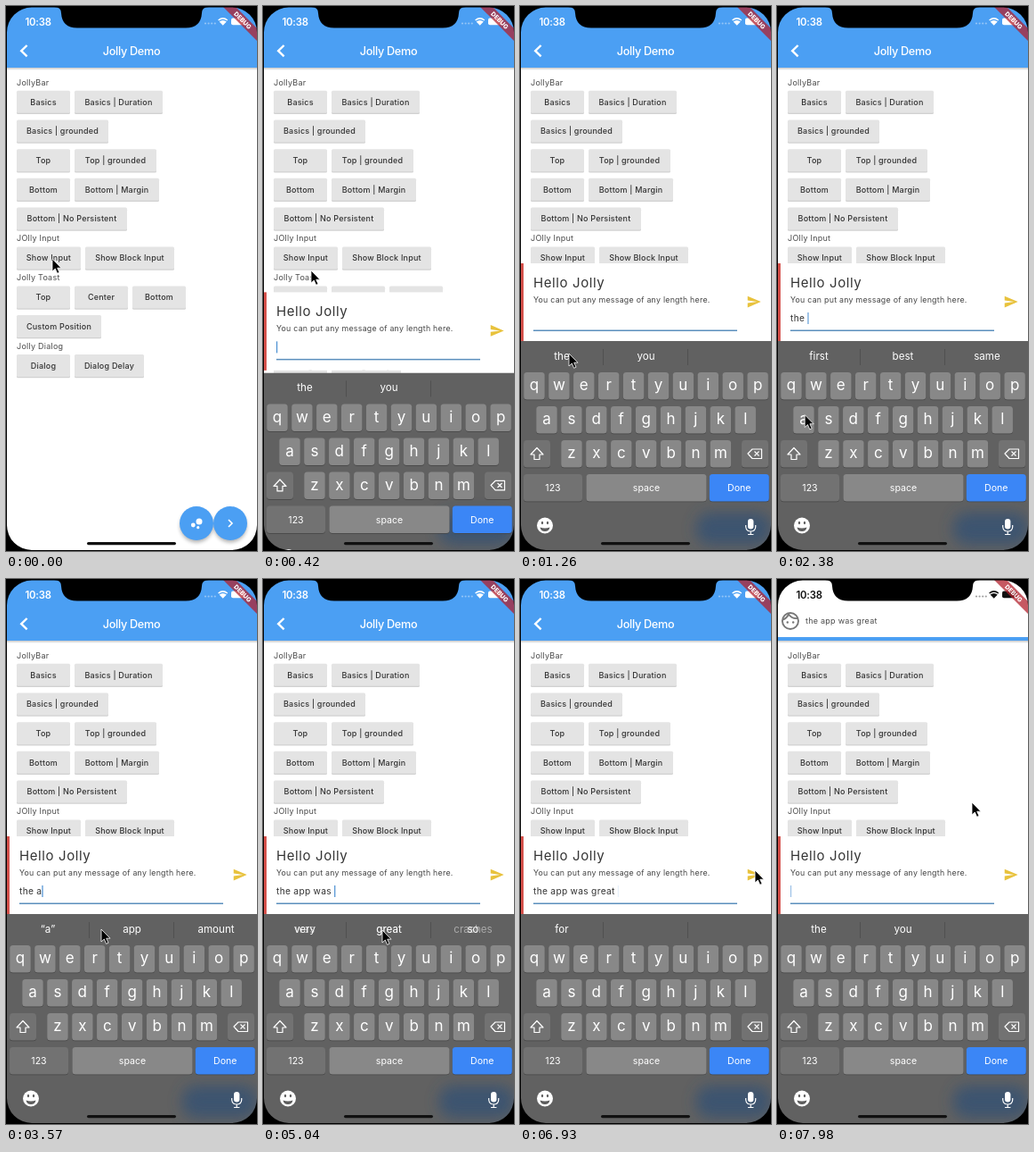
An HTML page for the animation above (8000 ms loop, 282x610 px).

```html
<!DOCTYPE html>
<html lang="en">
<head>
<meta charset="utf-8">
<title>Demo</title>
<style>
html, body { margin: 0; width: 100%; height: 100%; overflow: hidden; background: #fff; }
svg { display: block; width: 100vw; height: 100vh; }
text { font-family: Inter, "Open Sans", sans-serif; white-space: pre; }
.label { font-size: 9px; letter-spacing: .25px; fill: #4a4a4a; }
.button { font-size: 9px; font-weight: 500; letter-spacing: .2px; fill: #333; }
.hint { font-size: 11.6px; fill: #fff; }
.letter { font-size: 17px; fill: #fff; }
.command { font-size: 10.6px; fill: #fff; }
.mid { text-anchor: middle; }
</style>
</head>
<body>
<svg viewBox="0 0 282 610">
  <defs>
    <filter id="blur" x="-50%" y="-100%" width="200%" height="300%"><feGaussianBlur stdDeviation="8"/></filter>
    <filter id="soft" x="-40%" y="-40%" width="180%" height="180%"><feGaussianBlur stdDeviation="2"/></filter>
    <linearGradient id="fade" x2="0" y2="1"><stop stop-opacity=".22"/><stop offset="1" stop-opacity="0"/></linearGradient>
    <clipPath id="boardClip"><rect y="375" width="282" height="600"/></clipPath>
  </defs>
  <rect width="282" height="610" fill="#fff"/>

  <g id="page"></g>
  <rect y="69" width="282" height="3" fill="url(#fade)"/>
  <rect width="282" height="69" fill="#4b9ff3"/>
  <path d="M23.6 44L17.2 50.2L23.6 56.4" fill="none" stroke="#fff" stroke-width="2.4"/>
  <text class="mid" x="141" y="54.5" font-size="12.7" font-weight="500" letter-spacing="-.3" fill="#fff">Jolly Demo</text>

  <g fill="#000" opacity=".3" filter="url(#soft)"><circle cx="214" cy="582" r="18.5"/><circle cx="252" cy="582" r="18.5"/></g>
  <g fill="#4b9ff3"><circle cx="214" cy="579" r="19"/><circle cx="252" cy="579" r="19"/></g>
  <g fill="#fff"><circle cx="210.3" cy="581" r="2.4"/><circle cx="217" cy="577" r="3.5"/><circle cx="215.8" cy="583.7" r="1.6"/></g>
  <path d="M250 575l4 4l-4 4" fill="none" stroke="#fff" stroke-width="1.6"/>

  <g id="sheet">
    <rect y="288" width="282" height="87.5" fill="#fff"/>
    <rect y="288" width="4" height="87.5" fill="#d5504a"/>
    <text x="15" y="314.5" font-size="15" letter-spacing=".6" fill="#333">Hello Jolly</text>
    <text x="15" y="331.5" font-size="8.8" letter-spacing=".26" fill="#444">You can put any message of any length here.</text>
    <path transform="translate(254.3 322.5) scale(.71)" d="M2 21L23 12L2 3V10L17 12L2 14z" fill="#e8c23c"/>
    <text id="entry" x="15" y="352.5" font-size="10.2" letter-spacing=".3" fill="#333"></text>
    <rect id="caret" y="343" width="1.2" height="13" fill="#4a8fd2"/>
    <rect x="15" y="362.5" width="229" height="1.5" fill="#5b8fbd"/>
  </g>
  <g id="board" clip-path="url(#boardClip)">
    <rect y="375" width="282" height="236" fill="#616161"/>
    <rect id="glow" x="198" y="567" width="84" height="36" rx="16" fill="#2f4f76" opacity=".72" filter="url(#blur)"/>
    <path d="M93.5 384V402M188.5 384V402" stroke="#505050"/>
  </g>
  <rect id="home" x="91" y="600" width="100" height="3.2" rx="1.6" fill="#111"/>

  <g id="toast">
    <rect y="-10" width="282" height="75" fill="#fff"/>
    <g fill="none" stroke="#777" stroke-width="1.9">
      <circle cx="15" cy="47" r="9"/>
      <path d="M6.5 45.5Q11 44 13 39.5Q17 45 23.5 44"/>
    </g>
    <g fill="#777"><circle cx="11.8" cy="48.5" r="1.2"/><circle cx="18.2" cy="48.5" r="1.2"/></g>
    <text class="label" x="32" y="50.3">the app was great</text>
  </g>

  <g id="status">
    <text x="21.5" y="22" font-size="11.3" font-weight="600" letter-spacing="-.2">10:38</text>
    <g opacity=".4"><circle cx="224" cy="19.5" r="1.1"/><circle cx="227.6" cy="19.5" r="1.1"/><circle cx="231.2" cy="19.5" r="1.1"/><circle cx="234.8" cy="19.5" r="1.1"/></g>
    <path d="M239.6 17.5L243.7 21.8L247.8 17.5Q243.7 14.5 239.6 17.5z"/>
    <path d="M238.6 16Q243.7 11.6 248.8 16" fill="none" stroke="currentColor" stroke-width="1.6"/>
    <rect x="253" y="13.5" width="16" height="7.8" rx="2"/>
  </g>
  <g transform="translate(266 16) rotate(45)">
    <rect x="-40" y="-5" width="80" height="10" fill="#b2202c" opacity=".74"/>
    <text class="mid" y="2.6" font-size="7" font-weight="800" fill="#fff">DEBUG</text>
  </g>
  <path d="M0 0H282V610H0zM29 1.5A28 28 0 0 0 1 29.5V581A28 28 0 0 0 29 609H254A28 28 0 0 0 282 581V29.5A28 28 0 0 0 254 1.5z" fill-rule="evenodd"/>
  <path d="M54 1q8 0 8 7q1 16.5 18 16.5H202q17 0 18 -16.5q0 -7 8 -7z"/>
  <path id="pointer" d="M0 0V14L3.3 11L5.6 16.3L8 15.2L5.7 10.2H10z" stroke="#fff" stroke-width=".8"/>
</svg>
<script>
const $ = id => document.getElementById(id);
function add(parent, tag, attrs, content = '') {
  const node = document.createElementNS('http://www.w3.org/2000/svg', tag);
  for (const name in attrs) node.setAttribute(name, attrs[name]);
  node.textContent = content;
  return parent.appendChild(node);
}

// Page: labels by baseline, button rows by centre line
const page = $('page'), board = $('board');
[['JollyBar', 89], ['JOlly Input', 263], ['Jolly Toast', 307], ['Jolly Dialog', 384]]
  .forEach(([name, y]) => add(page, 'text', { class: 'label', x: 12, y }, name));

function button(name, x, y, width) {
  const box = { x, y: y - 12.5, width, height: 25, rx: 1.5 };
  add(page, 'rect', { ...box, y: y - 11.2, fill: '#000', opacity: .18 });
  add(page, 'rect', { ...box, fill: '#e4e4e4' });
  add(page, 'text', { class: 'button mid', x: x + width / 2, y: y + 3.2 }, name);
}
[
  [107.3, 'Basics', 60, 'Basics | Duration', 99],
  [140, 'Basics | grounded', 103],
  [172.7, 'Top', 60, 'Top | grounded', 92],
  [205.3, 'Bottom', 60, 'Bottom | Margin', 95],
  [238, 'Bottom | No Persistent', 124],
  [282, 'Show Input', 72, 'Show Block Input', 100],
  [326, 'Top', 60, 'Center', 60, 'Bottom', 60],
  [358.5, 'Custom Position', 95],
  [402.5, 'Dialog', 60, 'Dialog Delay', 78]
].forEach(([y, ...cells]) => {
  for (let i = 0, x = 12; i < cells.length; x += cells[i + 1] + 5, i += 2) button(cells[i], x, y, cells[i + 1]);
});

// Keyboard
function key(name, x, y, width, fill = '#888', style = 'letter') {
  const box = { x: x - width / 2, y: y - 15.3, width, height: 30.5, rx: 3.5 };
  add(board, 'rect', { ...box, y: y - 14.5, fill: '#444' });
  add(board, 'rect', { ...box, fill });
  add(board, 'text', { class: style + ' mid', x, y: y + (style === 'letter' ? 5 : 3.8) }, name);
}
[['qwertyuiop', 16], ['asdfghjkl', 30], ['zxcvbnm', 58]].forEach(([row, x], r) =>
  [...row].forEach((c, i) => key(c, x + 27.9 * i, 425.3 + 38 * r, 23.5)));
const dim = '#727272';
key('', 19, 501.3, 30, dim);
key('', 264, 501.3, 30, dim);
key('123', 37, 539.3, 66, dim, 'command');
key('space', 142, 539.3, 135, '#888', 'command');
key('Done', 246.3, 539.3, 67, '#3b86f6', 'command');
const line = { fill: 'none', stroke: '#fff', 'stroke-width': 1.2, 'stroke-linejoin': 'round' };
add(board, 'path', { ...line, d: 'M19 494.5L12 502H16V507.5H22V502H26z' });
add(board, 'path', { ...line, d: 'M256 501L261 496H271.5V506.5H261zM263.5 498.5l5 5m0-5l-5 5' });
add(board, 'circle', { cx: 28, cy: 581.5, r: 9, fill: '#fff' });
add(board, 'path', { d: 'M22.5 583.5Q28 585.5 33.5 583.5Q32.5 588 28 588T22.5 583.5z', fill: '#5c5c5c' });
for (const cx of [25, 31]) add(board, 'ellipse', { cx, cy: 578.5, rx: 1.1, ry: 1.7, fill: '#5c5c5c' });
add(board, 'rect', { x: 256, y: 574, width: 6.4, height: 11.5, rx: 3.2, fill: '#fff' });
add(board, 'path', { ...line, d: 'M253.7 581V583Q254 588 259.2 588T264.7 583V581M259.2 588V591.5M256 591.5H262.4' });

const hintSets = [
  [-1000, 'the', 'you', ''], [1550, 'first', 'best', 'same'], [3300, '“a”', 'app', 'amount'],
  [4100, 'was', 'great', 'crashes'], [4900, 'very', 'great', 'so'], [5420, 'for', '', ''], [7100, 'the', 'you', '']
].map(([time, ...words]) => {
  const node = add(board, 'g');
  words.forEach((word, i) => add(node, 'text', { class: 'hint mid', x: 47 + 94.5 * i, y: 396 }, word));
  return { time, node };
});

const entries = [[500, ''], [1400, 'the '], [3250, 'the a'], [3950, 'the app '], [4700, 'the app was '], [5300, 'the app was great '], [7050, '']];
const pointerPath = [
  [0, 52, 283], [420, 54, 296], [1150, 55, 389], [1600, 55, 389], [2500, 30, 461], [3250, 30, 461],
  [3570, 107, 392], [3750, 134, 392], [4050, 134, 392], [4500, 47, 392], [4750, 47, 392],
  [5010, 134, 393], [5500, 134, 393], [6700, 264, 326], [7150, 264, 326], [7750, 219, 250], [8000, 219, 250]
];

const clamp = v => Math.max(0, Math.min(1, v));
const easeOut = p => 1 - (1 - clamp(p)) ** 3;
const shift = (id, x, y) => $(id).setAttribute('transform', `translate(${x} ${y})`);

function pointerAt(t) {
  const i = pointerPath.findIndex(p => p[0] > t);
  const [t0, x0, y0] = pointerPath[i - 1], [t1, x1, y1] = pointerPath[i];
  const p = (t - t0) / (t1 - t0), s = p * p * (3 - 2 * p);
  return [x0 + (x1 - x0) * s, y0 + (y1 - y0) * s];
}

// Solid for half a second, then fades out and back in
function blink(age) {
  const p = Math.max(0, age) % 1000;
  return p < 500 ? 1 : Math.max(clamp((650 - p) / 150), clamp((p - 850) / 150));
}

function draw(now) {
  const t = now % 8000;
  const boardDrop = 236 * (1 - easeOut((t - 140) / 600));
  shift('sheet', 0, 322 * (1 - easeOut((t - 100) / 600)));
  shift('board', 0, boardDrop);
  shift('glow', 0, -boardDrop);
  shift('toast', 0, -70 * (1 - easeOut((t - 7150) / 450)));
  shift('pointer', ...pointerAt(t));
  const ink = t < 7300 ? '#fff' : '#111';
  $('status').setAttribute('fill', ink);
  $('status').setAttribute('color', ink);

  const [since, typed] = entries.findLast(e => e[0] <= t) || entries[0];
  $('entry').textContent = typed;
  $('caret').setAttribute('x', 15 + (typed ? $('entry').getComputedTextLength() : 0));
  $('caret').setAttribute('opacity', blink(t - since));

  // New hints appear quickly while the old ones linger
  hintSets.forEach(({ time, node }, i) => {
    const next = hintSets[i + 1];
    const gone = next ? clamp((t - next.time) / 260) : 0;
    node.setAttribute('opacity', clamp((t - time) / 100) * (1 - gone));
  });
  requestAnimationFrame(draw);
}
draw(performance.now());
</script>
</body>
</html>
```
